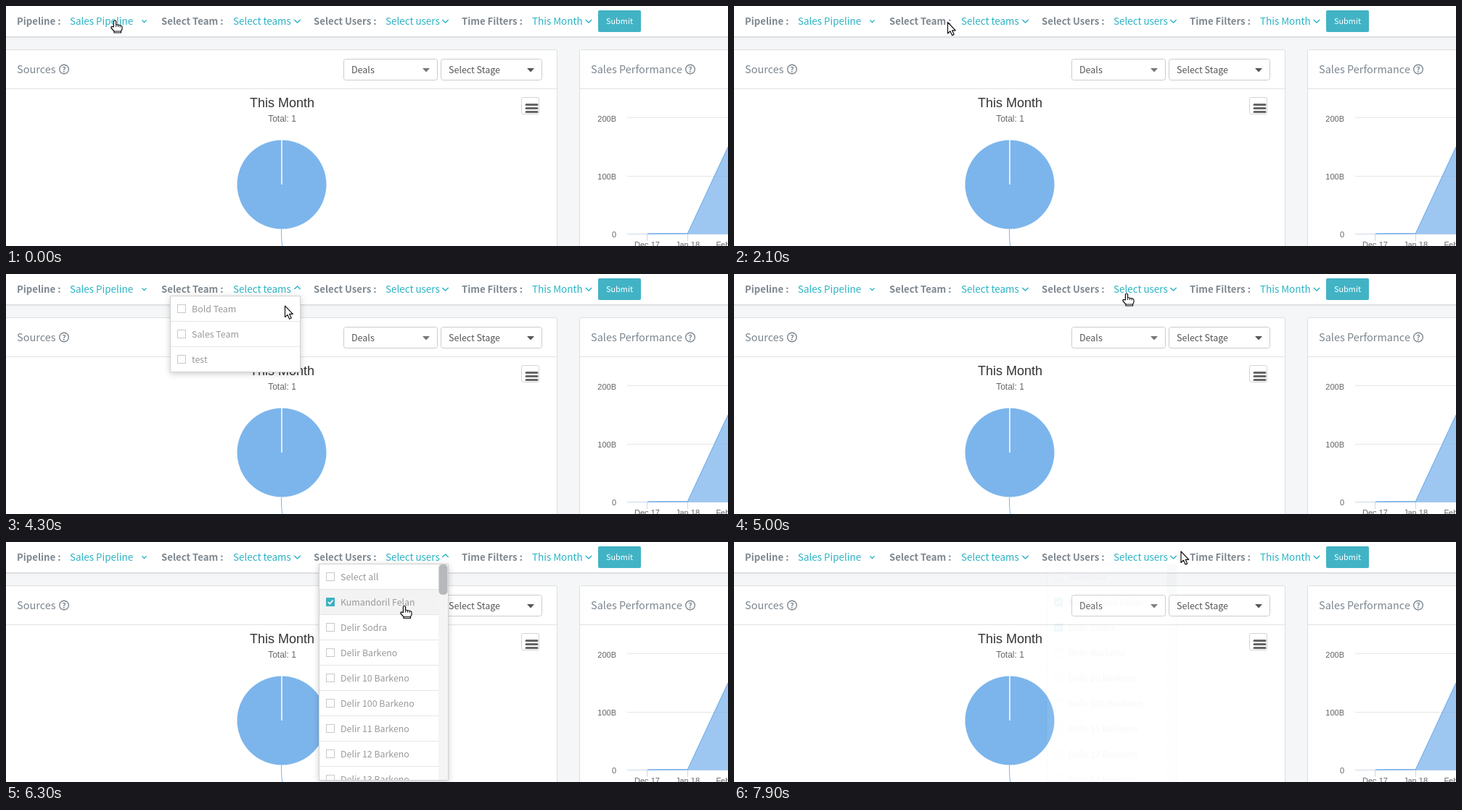
Recreate the animation shown at these times as an HTML page. Size 995x332 px, loop 8000 ms.

```html
<!DOCTYPE html>
<html lang="en">
<head>
<meta charset="utf-8">
<title>Sales dashboard</title>
<style>
html, body { margin: 0; width: 100%; height: 100%; overflow: hidden; background: #f5f6f8; }
svg { display: block; width: 995px; height: 332px; }
text { font-family: "Noto Sans CJK JP", "Noto Sans CJK SC", "Noto Sans", sans-serif; white-space: pre; }
.label { font-size: 13.2px; font-weight: 600; fill: #7f8890; }
.link { font-size: 13.43px; fill: #2bb3c4; }
.title { font-size: 14.5px; fill: #7c868f; }
.field { font-size: 12.5px; fill: #555; }
.item { font-size: 12.4px; font-weight: 300; fill: #999; }
.chart { font-family: "Liberation Sans", Arial, sans-serif; font-size: 11px; fill: #666; }
.menu { filter: drop-shadow(0 2px 4px rgba(0,0,0,.2)); }
.chev { fill: none; stroke: #2bb3c4; stroke-width: 1.4; }
</style>
</head>
<body>
<svg id="stage" viewBox="0 0 995 332"></svg>
<script>
const NS = 'http://www.w3.org/2000/svg';
const stage = document.getElementById('stage');

function add(parent, tag, attrs, text) {
  const el = document.createElementNS(NS, tag);
  for (const k in attrs) el.setAttribute(k, attrs[k]);
  if (text !== undefined) el.textContent = text;
  parent.appendChild(el);
  return el;
}
const rect = (p, x, y, width, height, fill, more) => add(p, 'rect', { x, y, width, height, fill, ...more });
const path = (p, d, more) => add(p, 'path', { d, fill: 'none', ...more });
const label = (p, cls, x, y, text, more) => add(p, 'text', { class: cls, x, y, ...more }, text);

// Page background and cards
rect(stage, 0, 0, 995, 332, '#f5f6f8');
rect(stage, 0, 42, 995, 1, '#d6d8da');
rect(stage, 0, 43, 995, 1, '#e7e9eb');
rect(stage, 0, 44, 995, 1, '#f0f1f3');
rect(stage, 0, 0, 995, 42, '#fff');
for (const [x, w] of [[-4, 764], [790, 240]]) {
  rect(stage, x + .5, 60.5, w - 1, 300, '#fff', { stroke: '#dcdee0', rx: 2 });
  rect(stage, x + 1, 114, w - 2, 1, '#dfe1e3');
}

// Filter bar
[['Pipeline :', 15], ['Select Team :', 214], ['Select Users :', 424], ['Time Filters :', 628]]
  .forEach(([s, x]) => label(stage, 'label', x, 26, s));
[['Sales Pipeline', 88], ['Select teams', 313], ['Select users', 523], ['This Month', 725]]
  .forEach(([s, x]) => label(stage, 'link', x, 26, s));

const chevron = (x, y, r) => path(stage, `M${x - r} ${y - r / 2}l${r} ${r}l${r} ${-r}`, { class: 'chev' });
chevron(190.5, 21, 3);
const teamChev = chevron(401.5, 21, 4.2);
const userChev = chevron(605.5, 21, 4.2);
chevron(803, 21, 4.2);
const flip = (el, x, up) => el.setAttribute('transform', up ? `rotate(180 ${x} 20)` : '');

rect(stage, 816, 6, 59, 30, '#42b3c5', { rx: 2 });
label(stage, 'field', 827, 25, 'Submit', { style: 'font-size:10.9px;fill:#fff' });

// Card headings
function heading(x, text, iconX) {
  label(stage, 'title', x, 93, text);
  add(stage, 'circle', { cx: iconX, cy: 87.5, r: 6.3, fill: 'none', stroke: '#7c868f', 'stroke-width': 1.4 });
  label(stage, 'title', iconX, 91.6, '?', { 'text-anchor': 'middle', style: 'font-size:10.5px;font-weight:700' });
}
heading(15, 'Sources', 80);
heading(806, 'Sales Performance', 943);

function field(x, w, text, color) {
  rect(stage, x + .5, 73.5, w - 1, 29, '#fff', { rx: 3, stroke: '#ccc' });
  label(stage, 'field', x + 11, 93, text);
  path(stage, `M${x + w - 21} 86h10l-5 5.5z`, { fill: color });
}
field(465, 130, 'Deals', '#777');
field(599, 140, 'Select Stage', '#555');

// Pie chart
label(stage, 'chart', 380.5, 140, 'This Month', { 'text-anchor': 'middle', style: 'font-size:18px;fill:#333' });
label(stage, 'chart', 380.5, 160, 'Total: 1', { 'text-anchor': 'middle', style: 'font-size:12px' });
rect(stage, 710.5, 126.5, 24, 23, '#fff', { rx: 2, stroke: '#d4d4d4' });
path(stage, 'M717 136.5h15M717 141.5h15M717 146.5h15', { stroke: '#666', 'stroke-width': 3, 'stroke-linecap': 'round' });
add(stage, 'circle', { cx: 380, cy: 247, r: 61.5, fill: '#7cb5ec' });
path(stage, 'M380 185V247', { stroke: '#fff', 'stroke-width': 1.5 });
path(stage, 'M379.5 309C379.5 318 379.5 324 381 333', { stroke: '#7cb5ec' });

// Area chart
path(stage, 'M856 154.5H995M856 235.5H995', { stroke: '#e6e6e6' });
path(stage, 'M856 315.5H995M883.5 316V325M939.5 316V325', { stroke: '#ccd6eb' });
path(stage, 'M884 315L939.5 314.5L995 195V315.5H884Z', { fill: '#7cb5ec', 'fill-opacity': .75 });
path(stage, 'M884 315L939.5 314.5L995 195', { stroke: '#7cb5ec', 'stroke-width': 1.3 });
[['200B', 160], ['100B', 240], ['0', 320]].forEach(([s, y]) => label(stage, 'chart', 841, y, s, { 'text-anchor': 'end' }));
['Dec 17', 'Jan 18', 'Feb 18'].forEach((s, i) => label(stage, 'chart', 883.5 + 56 * i, 334, s, { 'text-anchor': 'middle' }));

// Plain list under the pipeline filter
const list = add(stage, 'g', {});
rect(list, 75.5, 36.5, 148, 148, '#fff', { stroke: '#c4c6c8' });
rect(list, 76, 37, 147, 24.5, '#e8eaec');
['Sales Pipeline', 'New Business', 'Renewals', 'Partners', 'Support', 'Archive']
  .forEach((s, i) => label(list, 'field', 88, 54 + 24.6 * i, s));

// Checkbox menus
function menu(x, w, h, rowW, items) {
  const g = add(stage, 'g', { class: 'menu' });
  rect(g, x + .5, 30.5, w - 1, h - 1, '#fff', { stroke: '#d2d2d2' });
  const id = 'clip' + x;
  rect(add(g, 'clipPath', { id }), x, 30, w, h - 1, '#000');
  const body = add(g, 'g', { 'clip-path': `url(#${id})` });
  const rows = items.map((s, i) => {
    const y = 31 + 35 * i;
    const bg = rect(body, x + 1, y, rowW - 1, 34, '#f3f3f3');
    if (i < items.length - 1) rect(body, x + 1, y + 34, rowW - 1, 1, '#e6e6e6');
    rect(body, x + 10.5, y + 11.5, 11, 11, '#fff', { stroke: '#c9c9c9' });
    label(body, 'item', x + 30, y + 22, s);
    const tick = add(body, 'g', {});
    rect(tick, x + 10, y + 11, 12, 12, '#3fb0c4');
    path(tick, `M${x + 12.8} ${y + 17}l2.4 2.5l4.4 -5`, { stroke: '#fff', 'stroke-width': 1.7 });
    return { bg, tick };
  });
  return { g, rows };
}
const show = (el, on) => el.setAttribute('display', on ? 'inline' : 'none');
function setMenu(m, opacity, hover, ticked) {
  show(m.g, opacity > 0);
  m.g.setAttribute('opacity', opacity);
  m.rows.forEach((r, i) => {
    show(r.bg, i === hover);
    show(r.tick, ticked.includes(i));
  });
}
const teams = menu(226, 180, 106, 179, ['Bold Team', 'Sales Team', 'test']);
const users = menu(431, 179, 300, 165, ['Select all', 'Kumandoril Felan', 'Delir Sodra',
  ...['', '10 ', '100 ', '11 ', '12 ', '13 '].map(n => `Delir ${n}Barkeno`)]);
rect(users.g, 596, 31, 13, 298, '#f4f4f5');
rect(users.g, 596.5, 31, 12, 42, '#b7b8bc', { rx: 5 });

// Pointers, with the hot spot at 0,0
const ink = { stroke: '#111', 'stroke-width': 1.2, 'stroke-linejoin': 'round', fill: '#fff' };
const arrow = path(stage, 'M.5 .5V16L4 12.8L6.6 18.6L9.2 17.4L6.7 11.8H11.3Z', ink);
const hand = add(stage, 'g', {});
path(hand, 'M-1.6 9V1.2Q-1.4 0 0 0Q1.4 0 1.6 1.2V5.5L8.5 7Q10 7.4 10 9V12L8.5 15V17H-1V15L-5 10.5Q-5.5 8.6-4 8.4Z', ink);
path(hand, 'M1.7 5.5V9M4.5 6.5V9M7.2 7V9.5M-1 15H8.5', { stroke: '#111' });

// [time, x, y] stops of the pointer
const track = [
  [0, 150, 20], [1100, 150, 20], [1500, 165, 48], [2000, 290, 23], [2100, 294, 22], [2200, 294, 22],
  [2400, 308, 17], [2600, 308, 17], [2700, 334, 20], [2900, 334, 20], [3200, 338, 112],
  [3400, 321, 94], [3800, 315, 82], [4000, 315, 82], [4500, 430, 18], [4900, 536, 24],
  [5000, 541, 27], [5200, 569, 20], [5400, 567, 24], [5600, 553, 70], [5900, 552, 80], [6200, 552, 80],
  [6600, 540, 114], [7100, 638, 12], [7400, 602, 17], [7500, 602, 17], [7900, 615.5, 12.5], [8000, 615.5, 12.5]
];
const handTimes = [[0, 500], [2700, 3100], [3900, 4200], [4900, 5500], [5900, 6800], [7300, 7700]];

function pointer(t) {
  const i = track.findIndex(k => k[0] > t);
  const [t0, x0, y0] = track[i - 1], [t1, x1, y1] = track[i];
  const p = (t - t0) / (t1 - t0);
  return [x0 + (x1 - x0) * p, y0 + (y1 - y0) * p];
}
const clamp = v => Math.min(1, Math.max(0, v));
const swing = p => .5 - Math.cos(Math.PI * p) / 2;
const fade = (t, open, close) => clamp((t - open) / 300) * (1 - swing(clamp((t - close) / 300)));

function draw(ms) {
  const t = Math.floor(ms % 8000 / 100) * 100;
  show(list, t >= 500 && t < 1600);

  setMenu(teams, fade(t, 2950, 4670), t < 3200 ? -1 : t < 3500 ? 2 : t < 4300 ? 1 : -1, []);
  flip(teamChev, 401.5, t >= 3000 && t < 4700);

  const ticked = [6300, 6600].map((at, i) => t >= at ? i + 1 : -1);
  setMenu(users, fade(t, 5350, 7650), t < 5500 ? -1 : t < 6400 ? 1 : t < 6800 ? 2 : -1, ticked);
  flip(userChev, 605.5, t >= 5400 && t < 7600);

  const isHand = handTimes.some(([a, b]) => t >= a && t < b);
  const at = `translate(${pointer(t)})`;
  show(hand, isHand);
  show(arrow, !isHand);
  hand.setAttribute('transform', at);
  arrow.setAttribute('transform', at);
}

const start = performance.now();
function loop() {
  draw(performance.now() - start);
  requestAnimationFrame(loop);
}
loop();
</script>
</body>
</html>
```
